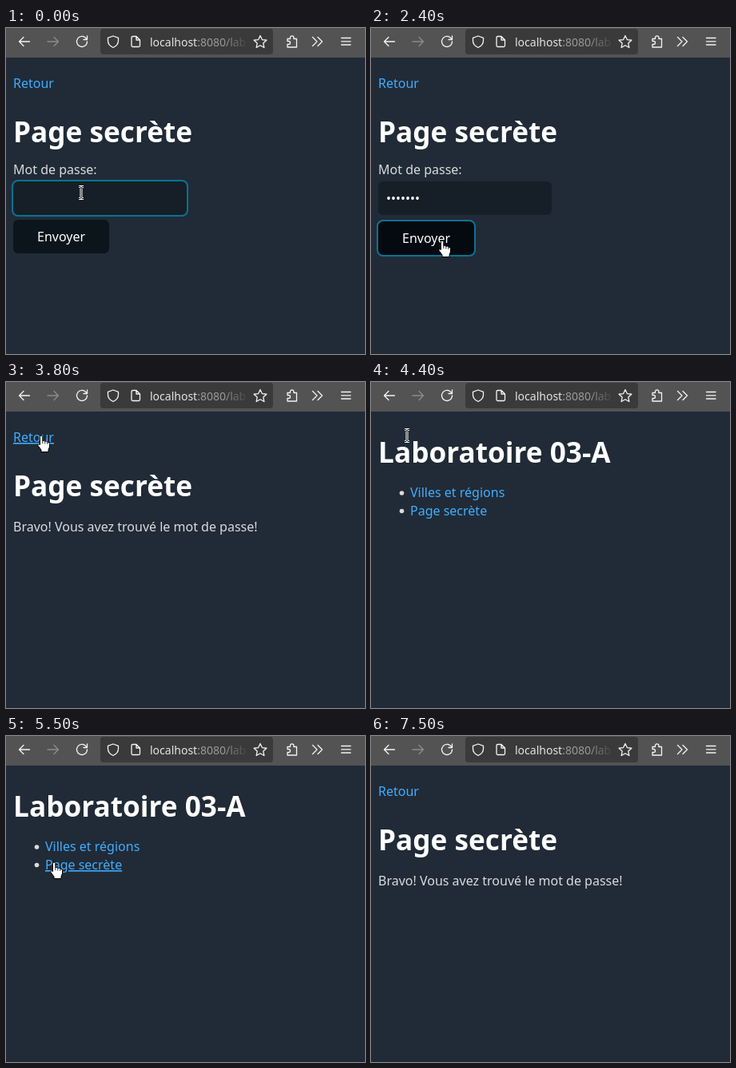
An HTML page that plays this animation: 449 px wide and 408 px high, repeating every 8.2 s.

```html
<!DOCTYPE html>
<html lang="fr">
<head>
<meta charset="utf-8">
<title>Page secrète</title>
<style>
  html, body { margin: 0; width: 100%; height: 100%; overflow: hidden; background: #202b37; }
  svg { display: block; width: 449px; height: 408px; }
  text { font: 16px "Noto Sans", sans-serif; fill: #dbdbdb; white-space: pre; }
  .title { font-size: 35.2px; font-weight: 700; fill: #fff; }
  .link { fill: #41adff; }
  .link.hover { text-decoration: underline; }
  .bright { fill: #fff; }
  .ring { fill: none; stroke: #0096bf; stroke-opacity: .67; stroke-width: 2; }
  .icons { fill: none; stroke: #f4f4f4; stroke-width: 1.3; stroke-linecap: round; stroke-linejoin: round; }
  .url { font-size: 14px; }
  #status text { font-size: 13.5px; fill: #eee; }
  .pointer { fill: #fff; stroke: #000; stroke-linejoin: round; }
</style>
</head>
<body>
<svg viewBox="0 0 449 408">
  <defs>
    <linearGradient id="fade" gradientUnits="userSpaceOnUse" x1="272" x2="304" y1="0" y2="0">
      <stop stop-color="#999"/><stop offset="1" stop-color="#999" stop-opacity="0"/>
    </linearGradient>
  </defs>
  <rect width="449" height="408" fill="#202b37"/>

  <g id="secret">
    <text id="back" class="link" x="9" y="75">Retour</text>
    <text class="title" x="9" y="143">Page secrète</text>
  </g>

  <g id="form">
    <text x="9" y="183">Mot de passe:</text>
    <rect x="9" y="192" width="217" height="42" rx="6" fill="#161f27"/>
    <rect id="inputRing" class="ring" x="8" y="191" width="219" height="44" rx="7"/>
    <text id="dots" class="bright" x="19" y="219"></text>
    <rect id="caret" y="203" width="1" height="21" fill="#fff"/>
    <g id="button">
      <rect id="buttonFace" x="9" y="240" width="120" height="42" rx="6"/>
      <rect id="buttonRing" class="ring" x="8" y="239" width="122" height="44" rx="7"/>
      <text class="bright" x="39" y="267">Envoyer</text>
    </g>
  </g>

  <text id="success" x="9" y="187">Bravo! Vous avez trouvé le mot de passe!</text>

  <g id="menu">
    <text class="title" x="9" y="101">Laboratoire 03-A</text>
    <g fill="#dbdbdb"><circle cx="38.5" cy="139" r="2.8"/><circle cx="38.5" cy="161.5" r="2.8"/></g>
    <text id="towns" class="link" x="49" y="144">Villes et régions</text>
    <text id="page" class="link" x="49" y="167">Page secrète</text>
  </g>

  <g id="status">
    <rect id="panel" y="387" height="21" fill="#3a3a3a"/>
    <text id="address" x="4" y="402"></text>
  </g>

  <g id="toolbar">
    <rect width="449" height="37" fill="#535353"/>
    <rect x="118" y="1" width="216" height="32" rx="4" fill="#3a3a3a"/>
    <text class="url" x="180" y="23" style="fill:#e4e4e4">localhost<tspan fill="url(#fade)">:8080/lab</tspan></text>
    <g class="icons">
      <path d="M29.5 17H16.5M22 11.5L16.5 17L22 22.5"/>
      <path stroke="#8c8c8c" d="M52 17H65.500M60 11.5L65.5 17L60 22.5"/>
      <path d="M100.500 13.500A6.500 6.500 0 1 0 101.500 17M101.500 10V14.500H97"/>
      <path d="M134 10L140.500 12.300V16Q140.500 21.500 134 24.500Q127.500 21.500 127.500 16V12.300Z"/>
      <path d="M157 12Q157 10.500 158.500 10.500H163L167.500 15V22Q167.500 23.500 166 23.500H158.500Q157 23.500 157 22ZM163 10.500V15H167.500"/>
      <path id="star"/>
      <path d="M352 13.500H355.500V12A2.200 2.200 0 0 1 359.900 12V13.500H363.500V24H352V20.500H353.500A2 2 0 0 0 353.500 16.500H352Z"/>
      <path d="M383.500 11.500L389 17L383.500 22.500M390 11.500L395.500 17L390 22.500"/>
      <path d="M419.500 12.500H431M419.500 16.800H431M419.500 21H431"/>
    </g>
  </g>

  <g id="cursor">
    <path id="arrow" class="pointer" d="M.5 0V15.500L4 12.300L6.500 18L9 17L6.600 11.500H11Z"/>
    <g id="hand">
      <path class="pointer" d="M-2.500 11.500V1.500Q-2.500 0-1 0Q.8 0 .8 1.500V6.500Q2.500 5.800 3.800 7.200Q5.500 6.600 6.800 8Q9.500 8 9.500 10.500V14L8 18V20.500H-1V18L-5 12.500Q-5.500 9.500-2.500 11.500Z"/>
      <path d="M.8 6.500V10M3.800 7.200V10.500M6.800 8V11" stroke="#000" stroke-width=".8"/>
    </g>
    <g id="beam" fill="none">
      <path stroke="#fff" stroke-width="3" d="M-3-7.500H-1L0-6.500L1-7.500H3M0-7V7M-3 7.500H-1L0 6.500L1 7.500H3"/>
      <path stroke="#111" d="M-3-7.500H-1L0-6.500L1-7.500H3M0-7V7M-3 7.500H-1L0 6.500L1 7.500H3"/>
    </g>
  </g>
</svg>
<script>
const LOOP = 8200, STEP = 100, DOT = 6.08;
const el = id => document.getElementById(id);
const show = (id, on) => { el(id).style.display = on ? "" : "none"; };
const mix = (a, b, k) => a + (b - a) * k;

const keyTimes = [400, 500, 600, 700, 900, 1000, 1200];
const site = "localhost:8080/lab03/";

// Each pose holds until the next: time, x, y, shape
const poses = [
  [0, 94, 206, "beam"], [400, 0, 0, ""], [1700, 88.5, 213, "beam"],
  [1900, 88.5, 225, "beam"], [2000, 89, 271, "hand"], [2100, 90, 266, "hand"],
  [2500, 90, 265, "arrow"], [3800, 45, 67, "hand"], [4400, 45, 67, "beam"],
  [4800, 53, 86, "beam"], [4900, 63, 116, "arrow"], [5000, 70, 137, "hand"],
  [5200, 67, 151, "hand"], [5300, 65, 156, "hand"], [5500, 61, 158, "hand"],
  [6000, 61, 160, "arrow"], [7500, 0, 0, ""]
];

function cursorAt(t) {
  if (t >= 3100 && t < 3800) {
    const k = (t - 3000) / 800, s = k * k * (3 - 2 * k);
    const y = mix(265, 67, s);
    const overText = (y > 170 && y < 193) || (y > 105 && y < 154);
    return [mix(90, 45, s), y, overText ? "beam" : "arrow"];
  }
  if (t >= 7000 && t < 7500) {
    const k = (t - 6900) / 600;
    return [mix(61, 70, k), mix(160, -20, k * k * (3 - 2 * k)), "arrow"];
  }
  return poses.filter(p => p[0] <= t).pop().slice(1);
}

function statusAt(t) {
  if (t >= 4000 && t < 4300) return ["index.php", t < 4100 ? .5 : 1];
  if (t >= 5200 && t < 5300) return ["villes-et-regions.php", .4];
  if (t >= 5900 && t < 6000) return ["page-secrete.php", 1];
  return ["", 0];
}

function draw(now) {
  const t = Math.floor(now % LOOP / STEP) * STEP;
  const inMenu = t >= 4400 && t < 6000, inForm = t < 2500;
  show("secret", !inMenu);
  show("menu", inMenu);
  show("form", inForm);
  show("success", !inForm && !inMenu);

  const typed = keyTimes.filter(k => k <= t).length;
  const pressed = t >= 2300;
  el("dots").textContent = "•".repeat(typed);
  el("caret").setAttribute("x", Math.floor(19.4 + typed * DOT));
  show("caret", t >= 300 && t < 1900);
  show("inputRing", !pressed);
  show("buttonRing", pressed);
  el("button").setAttribute("transform", `translate(0 ${pressed ? 2 : 0})`);
  el("buttonFace").setAttribute("fill", t < 2000 ? "#0c151c" : "#040a0f");

  el("back").classList.toggle("hover", t >= 3800 && t < 4400);
  el("towns").classList.toggle("hover", t >= 5000 && t < 5200);
  el("page").classList.toggle("hover", t >= 5200 && t < 6000);

  const [path, alpha] = statusAt(t);
  show("status", alpha > 0);
  if (alpha) {
    el("address").textContent = site + path;
    el("panel").setAttribute("width", el("address").getComputedTextLength() + 8);
    el("status").setAttribute("opacity", alpha);
  }

  const [x, y, shape] = cursorAt(t);
  el("cursor").setAttribute("transform", `translate(${x} ${y})`);
  for (const id of ["arrow", "hand", "beam"]) show(id, id === shape);
}

const starPoint = (_, i) => {
  const r = i % 2 ? 4 : 8.3, a = i * Math.PI / 5;
  return `${318 + r * Math.sin(a)} ${17.8 - r * Math.cos(a)}`;
};
el("star").setAttribute("d", `M${Array.from({ length: 10 }, starPoint).join("L")}Z`);

const start = performance.now();
function tick() {
  draw(performance.now() - start);
  requestAnimationFrame(tick);
}
tick();
</script>
</body>
</html>
```
